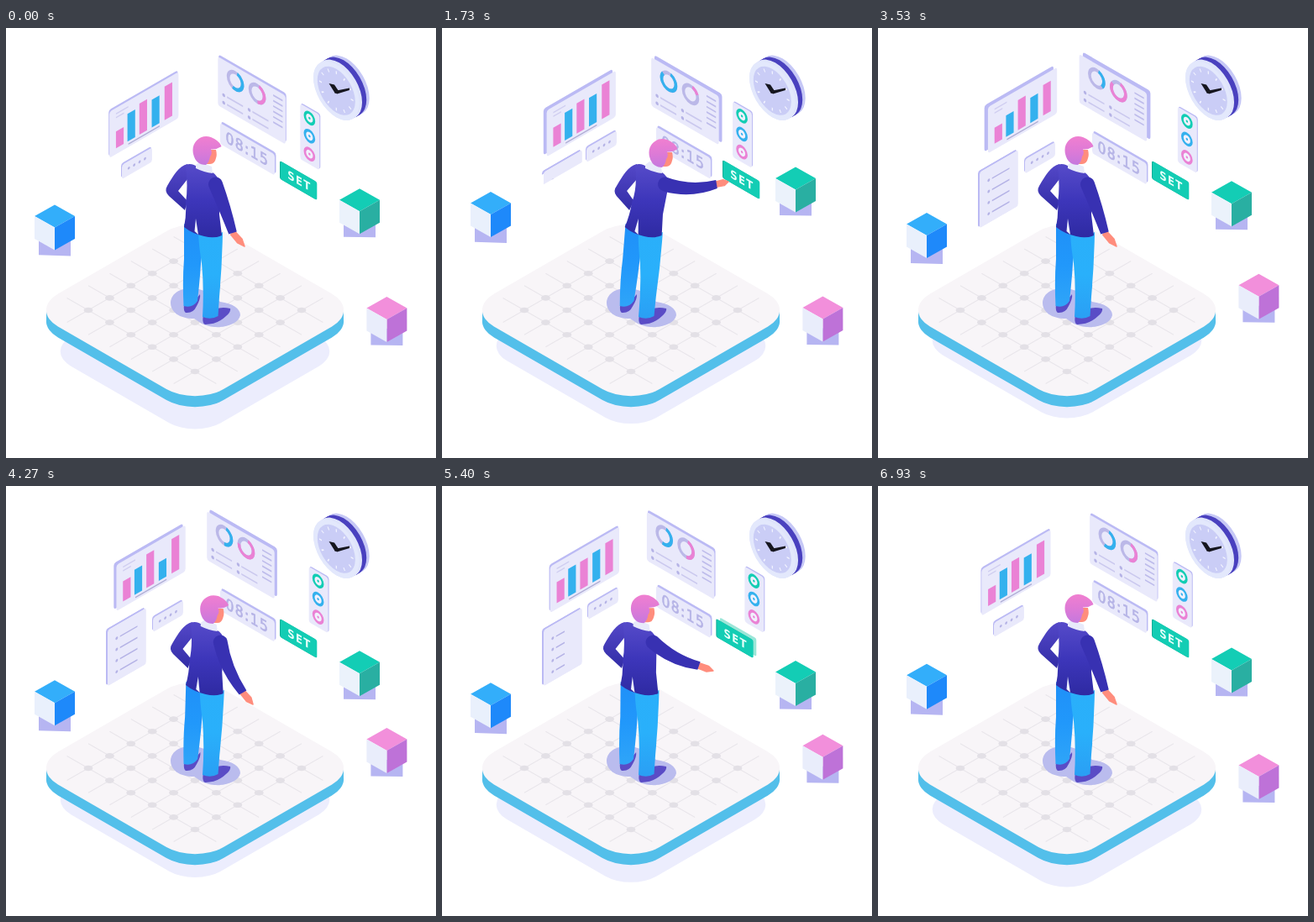
Write an HTML page that moves like this. It is 512 px wide and 512 px high and loops after 7000 ms.

```html
<!DOCTYPE html>
<html lang="en">
<head>
<meta charset="utf-8">
<title>Control room</title>
<style>
html, body { margin: 0; width: 100%; height: 100%; overflow: hidden; background: #fff; }
svg { display: block; width: 100vw; height: 100vh; }
text { font-family: "DejaVu Sans", sans-serif; }
</style>
</head>
<body>
<svg id="stage" viewBox="0 0 512 512"></svg>
<script>
const LOOP = 7000;
const FACE = '#e9e9fb', SLAB = '#bbbaf4', INK = '#b5b3e6';
const PINK = '#ea82d5', BLUE = '#34b1ee', TEAL = '#13cdb4';

const rect = (x, y, w, h, fill, extra = '') =>
  `<rect x="${x}" y="${y}" width="${w}" height="${h}" fill="${fill}" ${extra}/>`;
const circle = (x, y, r, fill, extra = '') =>
  `<circle cx="${x}" cy="${y}" r="${r}" fill="${fill}" ${extra}/>`;
const path = (d, fill, extra = '') => `<path d="${d}" fill="${fill}" ${extra}/>`;
const line = (d, stroke, width, extra = '') =>
  `<path d="${d}" fill="none" stroke="${stroke}" stroke-width="${width}" ${extra}/>`;
const group = (id, body) => `<g id="${id}">${body}</g>`;
const gradient = (id, ...stops) => `<linearGradient id="${id}" x1="0" y1="0" x2="0" y2="1">` +
  stops.map((c, i) => `<stop offset="${i / (stops.length - 1)}" stop-color="${c}"/>`).join('') +
  '</linearGradient>';
const repeat = (n, fn) => Array.from({ length: n }, (_, i) => fn(i)).join('');

// side: -1 for the left wall, 1 for the right wall
const wall = (side, x, y) => `matrix(.866 ${side * 0.5} 0 1 ${x} ${y})`;
const panel = (id, y, w, h, body) =>
  group(id + 'Slab', rect(0, y, w, h, SLAB, 'rx="3"')) +
  group(id, rect(0, y, w, h, FACE, 'rx="3"') + body);

function platform() {
  const tile = (y, k, fill) =>
    `<rect x="-139.3" y="-139.3" width="278.6" height="278.6" rx="48" fill="${fill}"
      transform="matrix(${0.7071 * k} ${0.408 * k} ${-0.7071 * k} ${0.408 * k} 225 ${y})"/>`;
  const node = (i, j) => [225 + (i - j) * 25.4, 336 + (i + j) * 14.6];
  let grid = '', nodes = '';
  for (let i = -2.5; i < 3; i++) {
    grid += `M${node(i, -3.5)}L${node(i, 3.5)}M${node(-3.5, i)}L${node(3.5, i)}`;
    for (let j = -2.5; j < 3; j++) {
      const [x, y] = node(i, j);
      nodes += `<ellipse cx="${x}" cy="${y}" rx="5.4" ry="3.3" fill="#e3e0e6"/>`;
    }
  }
  return group('ground', tile(0, 0.905, '#ecedfd')) +
    tile(349, 1, '#53bfea') + rect(48, 336, 354, 13, '#53bfea') + tile(336, 1, '#f8f5f8') +
    line(grid, '#e9e6eb', 1.1) + nodes;
}

const cube = (id, x, top, right, left, drop) => group(id,
  path(`M${x - 19},38H${x + 19}V${58 + drop}L${x - 19},${57.5 + drop * 0.8}Z`, '#b6b5f2') +
  path(`M${x},0L${x + 24},13.5L${x},27L${x - 24},13.5Z`, top) +
  path(`M${x},27L${x + 24},13.5V40.5L${x},54Z`, right) +
  path(`M${x},27L${x - 24},13.5V40.5L${x},54Z`, left));

function wallClock() {
  const disc = (d, r, fill) =>
    circle(0, 0, r, fill, `transform="${wall(1, 393.3 + d * 0.866, 74.8 - d * 0.5)}"`);
  const ticks = repeat(12, i => {
    const a = i * Math.PI / 6, c = Math.cos(a), s = Math.sin(a);
    return `M${20 * c},${20 * s}L${23.5 * c},${23.5 * s}`;
  });
  return repeat(15, i => {
    const d = 14 - i;
    return disc(d, 31.5, d > 10 ? '#c6c8f6' : d > 4 ? '#4a41bf' : '#dfe4fb');
  }) + disc(0, 31.5, '#e3e8fc') + disc(0, 26, '#cacdf6') +
    line(ticks, '#f4f5ff', 1.4, `transform="${wall(1, 393.3, 74.8)}"`) +
    path('M384.5,66L391,67.5L396,75L392,78Z', '#16161f') +
    path('M391,75L409,71.5L409,74L394,78.5Z', '#16161f') + circle(393.3, 75.5, 2.2, '#16161f');
}

const chart = () => panel('chart', -55, 95, 55,
  line('M9,-48h17M9,-43.5h11', '#cfcdf0', 1.5) +
  line('M26,-3.4h43', '#aeacd4', 1.5) +
  repeat(5, i => rect(9 + 15.5 * i + 0.3 * i * i, 0, 10.6, 0, i % 2 ? BLUE : PINK, 'class="bar"')));

function donuts() {
  const donut = (id, x, color) => circle(x, 17, 9.8, 'none', 'stroke="#bbb8e8" stroke-width="4.2"') +
    `<circle id="${id}" cx="${x}" cy="17" r="9.8" fill="none" stroke="${color}" stroke-width="4.2"
      pathLength="100" transform="rotate(-75 ${x} 17)"/>`;
  const rows = [[8, 42], [8, 51], [43, 42], [43, 51]].map(([x, y]) =>
    circle(x, y, 2, INK) + line(`M${x + 4.5},${y}h22`, '#cac8ee', 1.9)).join('');
  return panel('donuts', 0, 93, 58, donut('donutBlue', 24, BLUE) + donut('donutPink', 54, PINK) +
    rows + line(repeat(6, i => `M76,${8 + 6.4 * i}h13`), '#bebceb', 1.9));
}

const rings = () => panel('rings', 0, 26.5, 66, [TEAL, BLUE, PINK].map((c, i) =>
  circle(12.7, 11 + 21.4 * i, 6.3, '#f1f1fd', `stroke="${c}" stroke-width="3.2"`) +
  circle(12.7, 11 + 21.4 * i, 1.4, c)).join(''));

const timePanel = () => panel('time', 0, 75, 25,
  `<text x="7.5" y="18.8" font-size="18" letter-spacing="1.6" fill="${INK}" stroke="${INK}"
    stroke-width=".7">08:15</text>`);

const setButton = () =>
  group('glow', rect(0, 0, 50, 21.5, '#9be6d8', 'rx="2"')) +
  group('setSlab', rect(0, 0, 50, 21.5, '#0fae98', 'rx="2"')) +
  group('set', rect(0, 0, 50, 21.5, TEAL, 'rx="2"') +
    `<text x="25.8" y="15.6" font-size="13.5" font-weight="bold" letter-spacing="1.5"
      fill="#e9fffa" text-anchor="middle">SET</text>`);

const dots = () => panel('dots', -17, 41.5, 17,
  repeat(4, i => circle(9.5 + 7.4 * i, -8.5, 1.6, INK)));

const list = () => panel('list', -67, 53, 67,
  repeat(4, i => circle(12.5, -51 + 13.3 * i, 1.7, INK) + line('', INK, 1.7, 'class="row"')));

const BODY = [
  ['M212,329Q211,337 214,339Q223,340 227,331Q232,322 231,317Q222,330 212,329Z', '#5a4cc6'],
  ['M212,233Q222,242 236,244L233,262Q232,290 228,325Q222,334 211.5,331Q210,300 212,275Z', 'url(#legBack)'],
  ['M235,342Q233,351 237,353Q252,353 262,343Q268,338 267,334Q258,332 252,334Q252,343 235,342Z', '#5a4cc6'],
  ['M229,241Q245,250 258,243Q257.5,280 254,320L252.5,343Q244,348 234,344Q236,310 233,280Q229,255 229,241Z', 'url(#legFront)'],
  ['M216,162C206,164 199,176 192,188Q188,194 194,200L213,217L216,206L205,194L216,180Z', 'url(#sleeve)'],
  ['M214,163Q221,160 229,166Q238,172 246,172Q253,176 254,186L254,222L257,247Q248,251 236,248Q222,245 212,237Q215,222 214,208Q217,190 214,163Z', 'url(#sweater)'],
  ['M226,227L224.5,242L229,246Z', '#eef1fd'],
  ['M226,163L231,159L245,165L246,173Q236,172 226,167Z', '#e8eafa'],
];
const HEAD = [
  ['M238,145L250,145Q251.5,151 250,155Q248.5,162 243,162L236,162Z', '#ff8d7d'],
  ['M223,150Q221,140 227,134Q234,127 244,130Q254,134 256.5,141Q251,145 244,144.5Q246,150 243,153Q242,160 238,163Q226,163 223,150Z', 'url(#hair)'],
];
const blank = (cls, shapes) => shapes.map(([, fill]) => path('', fill, `class="${cls}"`)).join('');

const stage = document.getElementById('stage');
stage.innerHTML = '<defs>' +
  gradient('legBack', '#1f90f8', '#2198fb', '#2fa5f8') +
  gradient('legFront', '#2aaffa', '#29b0fb', '#2a9ff4') +
  gradient('sleeve', '#5448c8', '#322ca6') +
  gradient('sweater', '#564bc9', '#3d36ba', '#2e2aa2') +
  gradient('hair', '#f07fd0', '#de7ad6', '#c578de') + '</defs>' +
  platform() +
  cube('cubeBlue', 58, '#33aefa', '#1e89fa', '#e9f0fc', 3) +
  cube('cubeGreen', 421, '#13cdb5', '#29afa2', '#ebf2fb', 0) +
  cube('cubePink', 453.4, '#f28fdb', '#be72d8', '#e9edfb', 0) +
  wallClock() + chart() + dots() + list() + donuts() + rings() + timePanel() + setButton() +
  path('M196,327C197,314 210,309 224,310C240,312 248,320 255,326C270,328 279,334 279,342C277,352 262,357 248,356C236,355 230,350 224,346C206,346 196,338 196,327Z', '#babcee') +
  blank('body', BODY) + blank('head', HEAD) +
  path('', '#ff8d7d', 'id="hand" stroke="#ff8d7d" stroke-width="1.5" stroke-linejoin="round"') +
  path('', '#3831b2', 'id="arm"');

const $ = id => document.getElementById(id);
const all = cls => [...stage.querySelectorAll('.' + cls)];
const bars = all('bar'), rows = all('row'), bodyParts = all('body'), headParts = all('head');
const move = (id, transform) => $(id).setAttribute('transform', transform);

// Monotone cubic interpolation: flat at turning points, smooth between.
function track(times, values, t) {
  const last = times.length - 1;
  if (t <= times[0]) return values[0];
  if (t >= times[last]) return values[last];
  const slope = i => (values[i + 1] - values[i]) / (times[i + 1] - times[i]);
  const tangent = i => {
    if (i === 0 || i === last) return 0;
    const a = slope(i - 1), b = slope(i);
    return a * b > 0 ? 2 * a * b / (a + b) : 0;
  };
  let i = 0;
  while (t > times[i + 1]) i++;
  const h = times[i + 1] - times[i], p = (t - times[i]) / h, q = 1 - p;
  return values[i] * (1 + 2 * p) * q * q + values[i + 1] * p * p * (3 - 2 * p) +
    h * p * q * (tangent(i) * q - tangent(i + 1) * p);
}

const DATA_TIMES = [0, 800, 1730, 2730, 4270, 5400, 7000];
const BARS = [
  [20, 28, 23, 14, 24, 25, 20],
  [33, 36, 33, 22, 30, 33, 33],
  [37, 25, 36, 31, 40, 33, 37],
  [33, 40, 34, 39, 22, 35, 33],
  [40, 34, 41, 31, 41, 38, 40],
];
const DONUT_BLUE = [52, 72, 82, 20, 46, 50, 52];
const DONUT_PINK = [45, 18, 15, 85, 72, 45, 45];

// lean, elbow, wrist, fingertip
const REST = [0, 260, 214, 270, 244, 284, 260];
const LOW = [0.36, 265, 217, 282, 246, 294, 260];
const RISE = [0.54, 270, 217, 293, 246, 304, 256];
const POINT = [1, 296, 191, 327, 186, 341, 183];
const BACK = [0.1, 277, 204, 306, 214, 323, 220];
const GESTURE = [[0, REST], [400, REST], [800, RISE], [1500, POINT], [1850, POINT], [2600, REST],
  [3950, REST], [4270, LOW], [4850, POINT], [5000, POINT], [5400, BACK], [5950, REST]];
const GESTURE_TIMES = GESTURE.map(g => g[0]);

const lean = y => y > 240 ? Math.max(0, 5 * (335 - y) / 95) : 5 + 11 * Math.min(1, (240 - y) / 50);
const warp = (d, amount, dx = 0, dy = 0) => d.replace(/([\d.]+),([\d.]+)/g,
  (_, x, y) => `${+x + lean(+y) * amount + dx},${+y + dy}`);

// The two points at distance w on either side of (x, y), across a direction.
function across(x, y, dirX, dirY, w) {
  const k = w / Math.hypot(dirX, dirY);
  return [[x + dirY * k, y - dirX * k], [x - dirY * k, y + dirX * k]];
}

function drawMan(t) {
  const [amount, ex, ey, wx, wy, tx, ty] =
    REST.map((_, i) => track(GESTURE_TIMES, GESTURE.map(g => g[1][i]), t));
  bodyParts.forEach((el, i) => el.setAttribute('d', warp(BODY[i][0], amount)));
  headParts.forEach((el, i) => el.setAttribute('d', warp(HEAD[i][0], amount, 8 * amount, 3 * amount)));

  const sx = 249.5 + lean(186) * amount, sy = 186;
  const bendX = 2 * ex - (sx + wx) / 2, bendY = 2 * ey - (sy + wy) / 2;
  const s = across(sx, sy, ex - sx, ey - sy, 8.5);
  const e = across(bendX, bendY, wx - sx, wy - sy, 7.5);
  const w = across(wx, wy, wx - ex, wy - ey, 5);
  $('arm').setAttribute('d',
    `M${s[0]}Q${e[0]} ${w[0]}L${w[1]}Q${e[1]} ${s[1]}A8.5,8.5 0 0 1 ${s[0]}Z`);

  const dx = tx - wx, dy = ty - wy;
  const h = across(wx, wy, dx, dy, 3.2), m = across(wx + dx * 0.6, wy + dy * 0.6, dx, dy, 3.5);
  $('hand').setAttribute('d', `M${h[0]}L${m[0]}L${tx},${ty}L${m[1]}L${h[1]}Z`);
}

function draw(t) {
  const wave = (mid, amp, peak) => mid + amp * Math.cos(2 * Math.PI * (t - peak) / LOOP);
  const place = (id, side, x, y, dx, dy) => {
    move(id + 'Slab', wall(side, x + dx, y + dy));
    move(id, wall(side, x, y));
  };
  move('ground', `translate(0 ${wave(378.5, 6.5, 0)})`);
  move('cubeBlue', `translate(0 ${wave(215, -20.5, 1500)})`);
  move('cubeGreen', `translate(0 ${wave(186.5, -21.5, 2000)})`);
  move('cubePink', `translate(0 ${wave(306.5, 18.5, 850)})`);

  const depth = wave(2.6, -2.1, -700);
  place('chart', -1, wave(127, -4.5, 600), wave(152, 3, 500), -depth, -2);
  place('donuts', 1, wave(246, 7, 500), wave(32.6, 2.6, 1100), depth, -2.5);
  place('rings', 1, wave(353.5, -8, 1300), wave(91.8, -4.6, 1300), 1, -1);
  place('time', 1, 255, wave(118.5, -5.5, 200), 1.5, -2);

  bars.forEach((bar, i) => {
    const h = track(DATA_TIMES, BARS[i], t);
    bar.setAttribute('y', -7 - h);
    bar.setAttribute('height', h);
  });
  $('donutBlue').setAttribute('stroke-dasharray', `${track(DATA_TIMES, DONUT_BLUE, t)} 100`);
  $('donutPink').setAttribute('stroke-dasharray', `${track(DATA_TIMES, DONUT_PINK, t)} 100`);

  const slide = [0, 800, 1250, 1730, 2250, 2730, 4270, 4900, 5400, 6300];
  place('dots', -1, track(slide, [138, 142, 146, 172, 175, 175, 175, 175, 174, 138], t),
    track(slide, [180, 178, 175.5, 160, 170, 172, 174, 172, 159, 180], t), -1, -1.5);

  const height = track([1550, 1730, 2250, 5400, 5950], [0, 17, 67, 67, 0], t);
  const rowLength = track([2150, 2600, 5200, 5600], [0, 24, 24, 0], t);
  place('list', -1, 121, 238.5, -2, -1);
  ['list', 'listSlab'].forEach(id => {
    $(id).style.display = height > 0.5 ? '' : 'none';
    $(id).style.clipPath = `inset(0 0 ${100 - height / 0.67}% 0)`;
    $(id).firstChild.setAttribute('height', height);
  });
  rows.forEach((row, i) => row.setAttribute('d', `M17,${-51 + 13.3 * i}h${rowLength}`));

  const push = track([1480, 1700, 1820, 2050, 4820, 4980, 5060, 5450], [0, 8, 8, 0, 0, 8, 8, 0], t);
  place('set', 1, 327 + push, 158.5 - push / 8, -1, -0.5);
  move('glow', wall(1, 331, 156.5));
  $('glow').style.opacity = track([5100, 5300, 5450, 5650], [0, 1, 1, 0], t);

  drawMan(t);
}

function frame() {
  draw(performance.now() % LOOP);
  requestAnimationFrame(frame);
}
frame();
</script>
</body>
</html>
```
